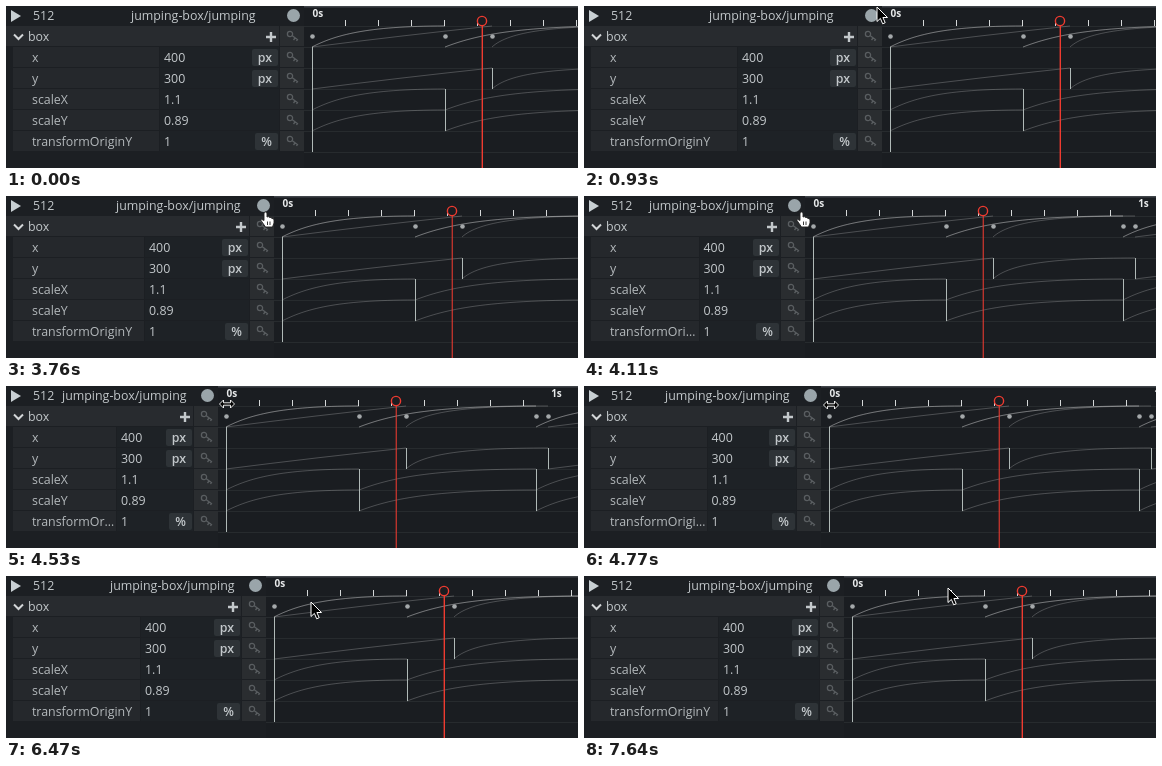
An HTML page that plays this animation: 572x162 px, repeating every 7990 ms.

```html
<!DOCTYPE html>
<html lang="en">
<head>
<meta charset="utf-8">
<title>Resizing the timeline panel</title>
<style>
html, body { margin: 0; width: 572px; height: 162px; overflow: hidden; background: #1a1d21; }
body { position: relative; font: 400 12.4px/21px "Open Sans", sans-serif; color: #c3c8cb; }
div, svg { position: absolute; white-space: nowrap; }
svg { overflow: visible; }
#panel { top: 0; left: 0; height: 162px; width: var(--w); overflow: hidden; background: #1c1f23; }
#count { left: 27px; top: -1px; }
#title { top: -1px; left: min(calc(var(--w) - 156px), calc(var(--w) / 2 - 24px)); }
#dot { right: 4px; top: 3px; width: 13px; height: 13px; border-radius: 50%; background: #9aa5aa; }
.row { left: 0; width: 100%; height: 21px; }
.head { left: 0; right: 25px; top: 0; height: 20px; background: #282b2f; padding-left: 22px; box-sizing: border-box; }
.label { left: 7px; width: calc(var(--w) / 2 - 22px); height: 20px; padding-left: 19px; background: #25282c;
  overflow: hidden; text-overflow: ellipsis; color: #b4b9bc; }
.value { left: calc(var(--w) / 2 + 5px); right: 25px; height: 20px; padding-left: 4px; background: #1e2226; }
.unit { right: 1px; top: 2px; height: 17px; line-height: 17px; padding: 0 6px; font-weight: 600;
  background: #2e3337; border-radius: 2px; }
.keycell { right: 0; width: 24px; height: 20px; background: #2a2d30; }
.keycell svg { left: 13px; top: 10px; }
#time { top: 0; left: var(--w); width: 572px; height: 162px; background: #1a1d21; overflow: hidden; }
#time text { font: 700 10px "Open Sans", sans-serif; fill: #e8eaeb; }
.curve { fill: none; stroke: #fff; stroke-opacity: .22; }
</style>
</head>
<body>
<div id="panel">
  <svg width="24" height="40">
    <path d="M5 4V16L15 10Z" fill="#c8cfd3"/>
    <path d="M8 28.5L12.5 33L17 28.5" fill="none" stroke="#d3d6d8" stroke-width="2"/>
  </svg>
  <div id="count">512</div>
  <div id="title">jumping-box/jumping</div>
  <div id="dot"></div>
</div>
<svg id="time"></svg>
<svg id="cursor" width="1" height="1">
  <path id="arrow" d="M0 0V14.5L3.4 11.4L5.7 16.8L8.2 15.7L5.9 10.5H10.5Z" stroke="#fff"/>
  <path id="resize" d="M-7.5 4L-3.5 0V2.8H3.5V0L7.5 4L3.5 8V5.2H-3.5V8Z" stroke="#fff" stroke-width=".9"/>
  <path id="hand" d="M0 4Q1.5 2 3 4V8Q4.5 7 5.5 8.5Q7 8 7.8 9.5Q10 9 10 11V14L8.5 18H1.5L-3 11.5Q-2.5 9.5 0 11.5Z
    M3.5 12.5V16M6 12.5V16" fill="#fff" stroke="#222" stroke-width=".9"/>
</svg>
<script>
const $ = id => document.getElementById(id);

// Property rows
const key = `<div class="keycell"><svg width="1" height="1"><g fill="none" stroke="#5a5e61" stroke-width="1.3">
  <circle cx="-3" cy="-2" r="2.6"/><path d="M-1 -.5L5 4M2 2L.5 4M4.5 3.5L3.5 5"/></g></svg></div>`;
const plus = `<svg width="1" height="1" style="right:7px;top:11px">
  <path d="M-5 0H5M0 -5V5" stroke="#c3c8cb" stroke-width="2.4"/></svg>`;
const props = [["x", 400, "px"], ["y", 300, "px"], ["scaleX", 1.1], ["scaleY", 0.89], ["transformOriginY", 1, "%"]];
const row = (i, html) => `<div class="row" style="top:${20 + i * 21}px">${html}${key}</div>`;
const prop = ([name, value, unit]) => `<div class="label">${name}</div>
  <div class="value">${value}${unit ? `<div class="unit">${unit}</div>` : ""}</div>`;
$("panel").insertAdjacentHTML("afterbegin",
  row(0, `<div class="head">box${plus}</div>`) + props.map((p, i) => row(i + 1, prop(p))).join(""));

// Timeline, with x measured from second zero
const rise = "C.17 .55 .4 1 1 1", linear = "C.33 .36 .67 .7 1 1", burst = "C.12 .75 .44 1 1 1";
const curve = (a, b, base, shape) => `<path class="curve" vector-effect="non-scaling-stroke"
  transform="translate(${a} ${base}) scale(${b - a} -21)" d="M0 0${shape}"/>`;
const line = (x, y1, y2, color = "#b0b9b7") => `<path d="M${x + .5} ${y1}V${y2}" stroke="${color}"/>`;
const scaleTrack = base => curve(0, 133, base, rise) + curve(133, 310, base, rise) + curve(310, 443, base, rise);
const yTrack = base => curve(0, 180, base, linear) + curve(180, 322, base, burst) + curve(322, 502, base, linear);

let art = `<path d="M-8 .75H564" stroke="#40454a" stroke-width="1.5"/>`;
for (let y = 20; y < 150; y += 21) art += `<path d="M-8 ${y + .5}H564" stroke="#272b2e"/>`;
for (let i = 1; i < 18; i++) if (i % 10) art += line(i * 33, 14, 20, "#d5d8d9");
art += scaleTrack(41) + scaleTrack(41) + scaleTrack(104) + scaleTrack(125) + yTrack(41) + yTrack(83);
art += line(0, 41, 146);
for (const x of [133, 310]) art += line(x, 83, 125);
for (const x of [180, 322]) art += line(x, 62, 83);
for (const x of [0, 133, 180, 310, 322]) art += `<circle cx="${x + .5}" cy="30.5" r="2.3" fill="#a4a8aa"/>`;
art += `<text x=".5" y="11">0s</text><text x="330.5" y="11" text-anchor="middle">1s</text>
  <g stroke="#ee3b30" stroke-width="1.4"><path id="head" d="M170.3 20V162"/>
  <circle cx="170" cy="15" r="4.6" fill="#1a1d21"/></g>`;
$("time").innerHTML = `<g transform="translate(8)">${art}</g>`;

// Pointer key points: time, x, y
const points = [[60, 354, 160], [400, 320, 44], [650, 288, 4], [930, 293, 1], [1330, 300, 13], [3470, 299, 13],
  [4000, 224, 13], [4330, 200, 14], [4800, 250, 15], [5210, 261, 16], [6080, 261, 16], [6350, 285, 30],
  [6760, 353, 15], [7470, 354, 15], [7640, 364, 12], [7990, 364, 12]];
const dragStart = 3470, dragEnd = 5210, lag = 80;

function pointer(t) {
  const i = Math.max(1, points.findIndex(p => p[0] > t));
  const [t0, x0, y0] = points[i - 1], [t1, x1, y1] = points[i];
  const f = Math.max(0, (t - t0) / (t1 - t0));
  return [Math.round(x0 + (x1 - x0) * f), Math.round(y0 + (y1 - y0) * f)];
}

function draw() {
  const t = performance.now() % 7990;
  const [x, y] = pointer(t);
  // The panel edge trails the pointer while dragged
  const width = pointer(Math.min(dragEnd, Math.max(dragStart, t - lag)))[0] - 1;
  const dragging = t > dragStart && t < dragEnd;
  const onEdge = t >= 2820 && t < 6090;
  const kind = t < 60 ? "" : !onEdge ? "arrow" : dragging && x < width - 1 ? "hand" : "resize";
  document.body.style.setProperty("--w", width + "px");
  $("cursor").style.transform = `translate(${x}px,${y}px)`;
  for (const id of ["arrow", "resize", "hand"]) $(id).style.display = id === kind ? "" : "none";
  $("head").style.opacity = dragging ? .75 : 1;
  requestAnimationFrame(draw);
}
draw();
</script>
</body>
</html>
```
